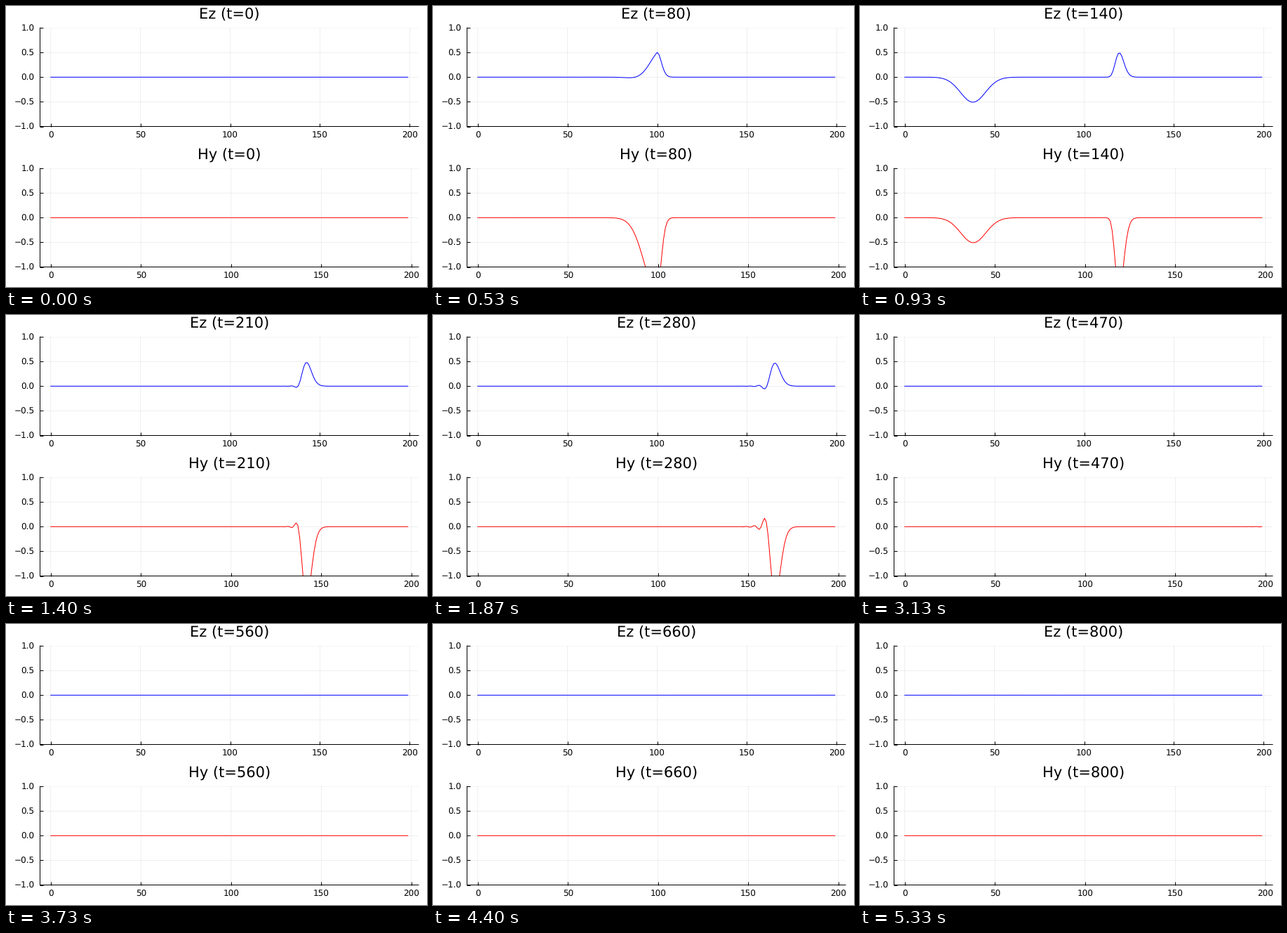
A matplotlib script for the animation above (5.39 s loop, 600 by 400 pixels).

```python
import numpy as np
import matplotlib.pyplot as plt
from matplotlib.animation import FuncAnimation

W, H, DPI = 600, 400, 100
FRAMES, TICK_MS = 245, 22
PICTURE_MS = 1000 / 15
CELLS, SOURCE, SURFACE = 200, 50, 100
EPS_R = 9.0
LAST_STEP, STRIDE = 800, 10
PX = 72 / DPI  # one pixel in points

plt.rcParams.update({
    "font.family": "DejaVu Sans",
    "text.hinting": "no_hinting",
    "path.simplify": False,
    "path.snap": False,
})


def pulse(t):
    return np.exp(-((t - 30) / 10) ** 2)


def absorb(now, prev, older, speed):
    """Second-order absorbing value for the end cell; each argument runs inwards."""
    a, b = speed + 1 / speed, speed - 1 / speed
    return ((2 - a) * (now[2] + older[0])
            - 2 * b * (prev[0] + prev[2] - now[1] - older[1])
            + 4 * a * prev[1]) / (a + 2) - older[2]


def simulate():
    """1D FDTD: a pulse meets a dielectric half-space; Hy is scaled by the impedance."""
    ez, hy = np.zeros(CELLS), np.zeros(CELLS - 1)
    prev, older = ez.copy(), ez.copy()
    eps = np.where(np.arange(CELLS) < SURFACE, 1.0, EPS_R)
    history = []
    for t in range(LAST_STEP + 1):
        hy += np.diff(ez)
        hy[SOURCE - 1] -= pulse(t)
        ez[1:-1] += np.diff(hy) / eps[1:-1]
        ez[SOURCE] += pulse(t + 1)

        ez[0] = absorb(ez[:3], prev[:3], older[:3], 1.0)
        ez[-1] = absorb(ez[:-4:-1], prev[:-4:-1], older[:-4:-1], 1 / np.sqrt(EPS_R))
        prev, older = ez.copy(), prev

        if t % STRIDE == 0:
            history.append((ez.copy(), hy.copy()))
    return history


def make_panel(fig, top, count, color):
    left, width, height = 48.5, 539.5, 140.4
    ax = fig.add_axes([left / W, 1 - (top + height) / H, width / W, height / H])
    pad = 0.03 * (count - 1)
    ax.set_xlim(-pad, count - 1 + pad)
    ax.set_ylim(-1, 1)
    ax.set_xticks(range(0, 201, 50))
    ax.set_yticks(np.linspace(-1, 1, 5))
    ax.spines[["top", "right"]].set_visible(False)
    ax.spines[["left", "bottom"]].set_linewidth(PX)
    ax.tick_params(direction="in", length=5 * PX, width=PX, labelsize=12 * PX)
    ax.tick_params(axis="x", pad=7 * PX)
    ax.tick_params(axis="y", pad=8 * PX)
    ax.grid(color="black", alpha=0.1, linewidth=0.6 * PX)
    ax.set_axisbelow(True)
    line, = ax.plot(np.arange(count), np.zeros(count), color=color, linewidth=PX)
    title = fig.text((left + width / 2) / W, 1 - (top - 12.7) / H, "",
                     fontsize=21 * PX, ha="center", va="baseline")
    return line, title


history = simulate()
fig = plt.figure(figsize=(W / DPI, H / DPI), dpi=DPI, facecolor="white")
panels = [
    ("Ez", *make_panel(fig, 31.1, CELLS, "blue")),
    ("Hy", *make_panel(fig, 231.1, CELLS - 1, "red")),
]


def update(i):
    # 15 pictures a second, with starts rounded to 10 ms
    k = int(((i + 1) * TICK_MS + 4) / PICTURE_MS)
    for (name, line, title), field in zip(panels, history[k]):
        line.set_ydata(field)
        title.set_text(f"{name} (t={k * STRIDE})")
    return [artist for panel in panels for artist in panel[1:]]


anim = FuncAnimation(fig, update, frames=FRAMES, interval=TICK_MS,
                     repeat=True, repeat_delay=0)
plt.show()
```
